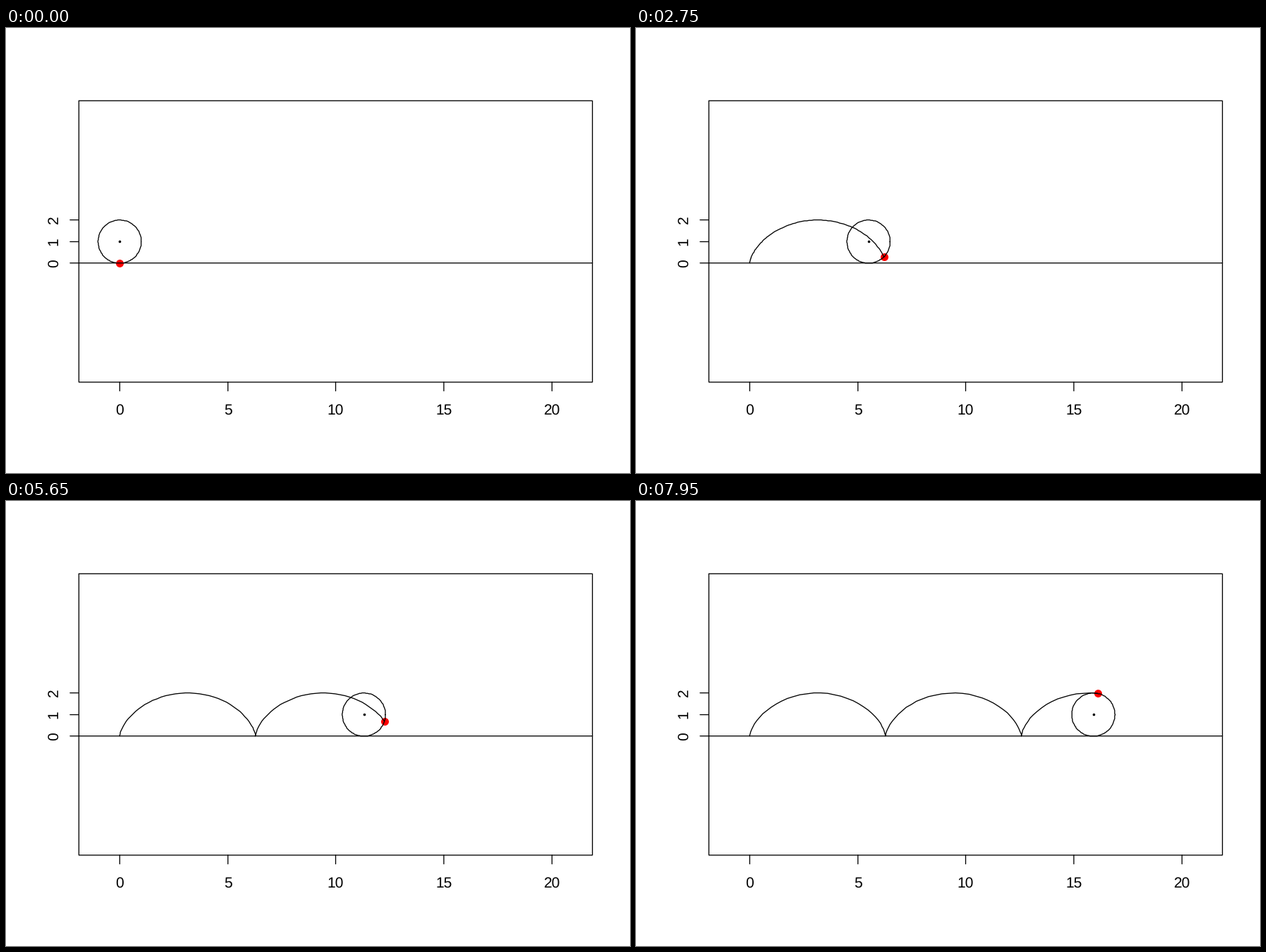
Write a matplotlib script that moves like this. It is 885 px wide and 632 px high and loops after 8000 ms.

```python
import numpy as np
import matplotlib.pyplot as plt
from matplotlib.animation import FuncAnimation

W, H, DPI = 885, 632, 100
FRAMES, INTERVAL = 160, 50
PX = 72 / DPI                      # points per pixel

# The plot is laid out on a 7 x 5 inch device of 192 dpi and scaled down.
DEV_W, DEV_H = 1344, 960
LEFT, RIGHT, TOP, BOTTOM = 157, 1263, 157, 764
UNIT, X0, Y0 = 46.546, 244.95, 507.35
TICK = 19

plt.rcParams["font.family"] = "Liberation Sans"
plt.rcParams["text.hinting"] = "none"
plt.rcParams["path.simplify"] = False

fig = plt.figure(figsize=(W / DPI, H / DPI), dpi=DPI, facecolor="white")
ax = fig.add_axes([0, 0, 1, 1])
ax.set(xlim=(0, DEV_W), ylim=(DEV_H, 0))
ax.axis("off")


def sx(x):
    return np.round(X0 + UNIT * np.asarray(x))


def sy(y):
    return np.round(Y0 - UNIT * np.asarray(y))


def stroke(x, y, z=2):
    return ax.plot(x, y, color="black", lw=1.32 * PX, zorder=z, snap=False,
                   solid_capstyle="round", solid_joinstyle="round")[0]


def dot(size, color, z):
    return ax.plot([], [], "o", ms=size * PX, color=color, mew=0, zorder=z,
                   snap=False)[0]


def label(x, y, value, angle=0):
    ax.text(x, y, str(value), size=21.07 * PX, rotation=angle,
            rotation_mode="anchor", ha="center", va="baseline")


# Plot box, ground line and axes
stroke([LEFT, RIGHT, RIGHT, LEFT, LEFT], [TOP, TOP, BOTTOM, BOTTOM, TOP])
stroke([LEFT, RIGHT], sy([0, 0]))
for v in range(0, 21, 5):
    stroke(sx([v, v]), [BOTTOM, BOTTOM + TICK])
    label(sx(v), 833, v)
for v in range(3):
    stroke([LEFT - TICK, LEFT], sy([v, v]))
    label(112, sy(v), v, 90)

red = dot(11, "red", 3)
hub = dot(3.6, "black", 4)
wheel = stroke([], [], 4)
trail = stroke([], [], 4)
angle = np.linspace(0, 2 * np.pi, 100)


def draw(i):
    t = i / 10
    s = np.linspace(0, t, 100)
    x, y = s - np.sin(s), 1 - np.cos(s)
    trail.set_data(sx(x), sy(y))
    wheel.set_data(sx(t + np.cos(angle)), sy(1 + np.sin(angle)))
    hub.set_data([sx(t)], [sy(1)])
    red.set_data([sx(x[-1])], [sy(y[-1])])
    return trail, wheel, hub, red


anim = FuncAnimation(fig, draw, frames=FRAMES, interval=INTERVAL,
                     repeat=True, repeat_delay=0, blit=False)
plt.show()
```
